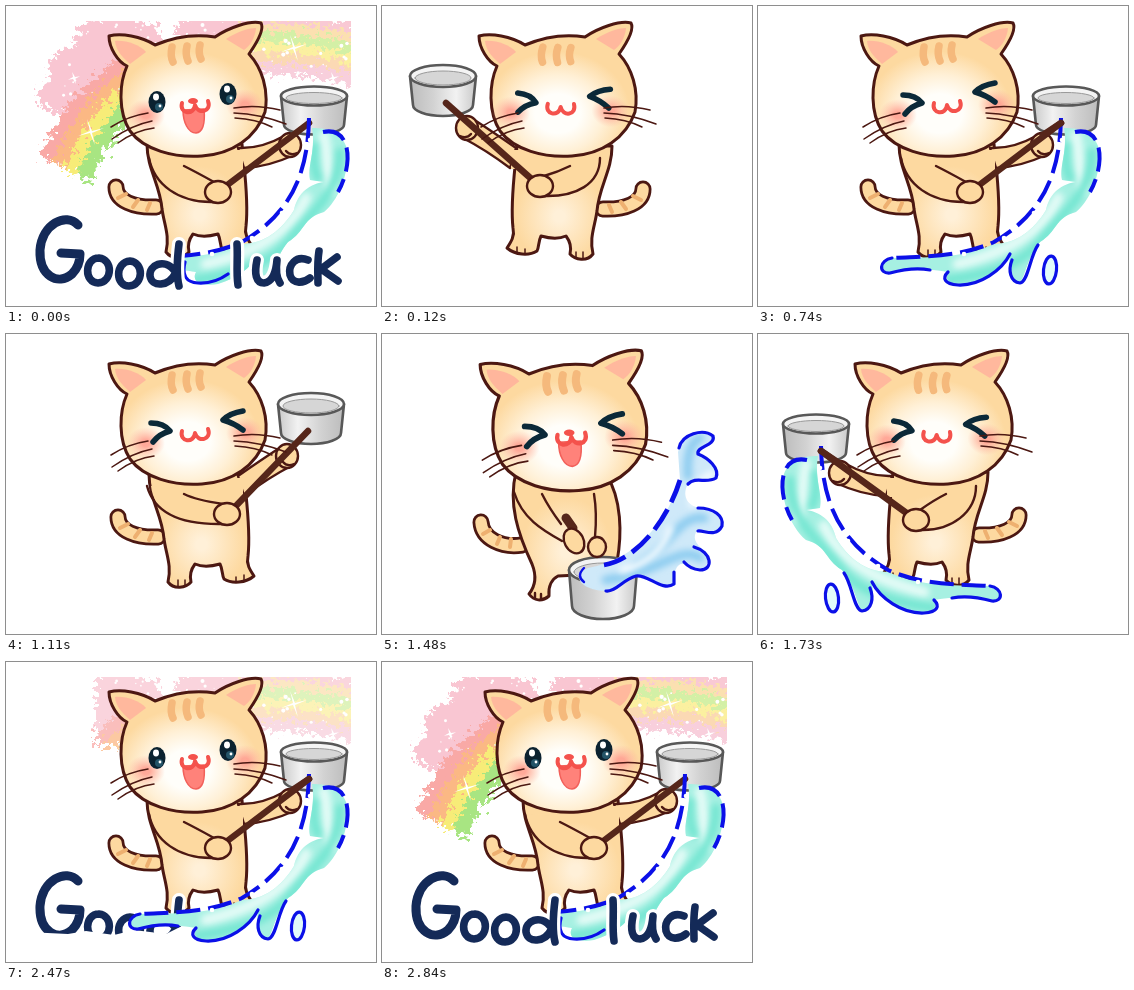
These frames come from a looping animation (370x300 px, 2.96 s). An HTML page:

```html
<!DOCTYPE html>
<html lang="en">
<head>
<meta charset="utf-8">
<title>Good luck</title>
<style>
html, body { margin: 0; width: 100%; height: 100%; overflow: hidden; background: #fff; }
svg { display: block; width: 370px; height: 300px; }
.fur { fill: #fdd9a0; stroke: #4c1812; stroke-width: 3; }
.limb { stroke-width: 2.4; }
.line { fill: none; stroke: #4c1812; stroke-width: 2.4; }
.hair { fill: none; stroke: #4c1812; stroke-width: 1.5; }
.stripe { fill: none; stroke: #f5b97c; stroke-width: 7.5; }
.blue { fill: none; stroke: #0b10e8; stroke-width: 3.2; }
.dash { stroke-width: 4; stroke-dasharray: 24 8; stroke-linecap: butt; }
.lid { fill: none; stroke: #0b2938; stroke-width: 5.5; }
.wood { fill: none; stroke: #56261a; stroke-width: 6.5; }
.metal { stroke: #585858; stroke-width: 2.6; }
.ink { fill: none; stroke: #142a58; }
.halo { fill: none; stroke: #fff; }
</style>
</head>
<body>
<svg id="stage" viewBox="0 0 370 300" stroke-linecap="round" stroke-linejoin="round">
  <defs>
    <radialGradient id="skin" cx=".5" cy=".68" r=".58">
      <stop offset=".25" stop-color="#fffefa"/><stop offset=".5" stop-color="#fff0d6"/>
      <stop offset=".8" stop-color="#fdd9a0"/>
    </radialGradient>
    <radialGradient id="belly" cx=".5" cy=".62" r=".5">
      <stop offset=".1" stop-color="#fff0d8"/><stop offset=".85" stop-color="#fdd9a0"/>
    </radialGradient>
    <radialGradient id="blush">
      <stop offset=".2" stop-color="#ffa192" stop-opacity=".9"/><stop offset="1" stop-color="#ffb6a0" stop-opacity="0"/>
    </radialGradient>
    <linearGradient id="tin">
      <stop offset="0" stop-color="#c9c9c9"/><stop offset=".3" stop-color="#f2f2f2"/>
      <stop offset=".65" stop-color="#d2d2d2"/><stop offset="1" stop-color="#bcbcbc"/>
    </linearGradient>
    <filter id="rough" x="-10%" y="-20%" width="120%" height="140%">
      <feTurbulence type="fractalNoise" baseFrequency=".2" numOctaves="3" seed="4"/>
      <feDisplacementMap in="SourceGraphic" scale="24" xChannelSelector="R" yChannelSelector="G"/>
    </filter>
    <filter id="soft"><feGaussianBlur stdDeviation="3"/></filter>
    <clipPath id="sky"><path d="M28,15H345V182H28Z"/></clipPath>
    <clipPath id="skyHalf"><path d="M90,0H360V84H90Z"/></clipPath>
    <clipPath id="skyMost"><path d="M20,0H360V190H20Z"/></clipPath>
    <clipPath id="wordHalf"><path d="M20,200H180V262L160,272L128,268L108,273L80,269L62,272L20,270Z"/></clipPath>
    <clipPath id="tailEnd"><path d="M50,205H343V285H50Z"/></clipPath>
    <clipPath id="noTip"><path d="M175,100H345V285H175Z"/></clipPath>
    <clipPath id="wet"><path id="wetEdge"/></clipPath>
    <clipPath id="splashClip"><path id="splashEdge"/></clipPath>
  </defs>
</svg>
<script>
const LOOP = 2960, AXIS = 366;
const stage = document.getElementById('stage');

const path = (d, cls, extra = '') => `<path class="${cls}" d="${d}" ${extra}/>`;
const brush = (d, color, width, extra = '') =>
  path(d, '', `fill="none" stroke="${color}" stroke-width="${width}" ${extra}`);
const oval = (x, y, rx, ry, extra = '') => `<ellipse cx="${x}" cy="${y}" rx="${rx}" ry="${ry}" ${extra}/>`;
const group = (inner, attrs) => `<g ${attrs}>${inner}</g>`;
const flip = inner => group(inner, `transform="translate(${AXIS} 0) scale(-1 1)"`);
const move = (inner, x, y) => group(inner, `transform="translate(${x} ${y})"`);
const stretch = (inner, x) => group(inner, `transform="translate(${x} -1) scale(1.06 1.05)"`);

function random(seed) {
  return () => (seed = (seed * 16807) % 2147483647) / 2147483647;
}

// Head, shared by all poses
const skull = 'M121,60C113,78 112,106 124,125C138,144 168,152 196,150C226,148 250,132 259,106' +
  'C263,84 256,62 243,48C250,38 259,24 255,17C244,14 222,22 209,31C190,28 168,31 149,39' +
  'C135,30 115,27 103,30C103,42 112,56 121,60Z';

function eyes(open) {
  if (!open) return path('M145,89Q158,89 164,97Q153,100 147,108M237,77Q224,79 217,86Q228,89 237,96', 'lid');
  return [[151, 96], [222, 88]].map(([x, y]) =>
    oval(x, y, 8.5, 11, 'fill="#0b2230"') + oval(x + 2, y + 5, 4, 4, 'fill="#245468"') +
    oval(x - 1, y - 5, 3, 3.4, 'fill="#fff"') + oval(x + 3, y + 4, 1.4, 1.4, 'fill="#fff"')).join('');
}

function mouth(open) {
  const tongue = open ? path('M177,104C177,116 182,127 190,127C198,126 199,114 198,103Z', '',
    'fill="#ff827a" stroke="#f2605a" stroke-width="1.5"') : '';
  return tongue +
    brush('M176,97C173,108 188,110 189,99C192,109 206,106 202,95', '#f4524c', 4) +
    (open ? oval(187, 95, 5, 3, 'fill="#f4524c"') : '');
}

function head(eyesOpen, mouthOpen, turn = 0) {
  const face = path('M166,41Q164,50 167,56M181,40Q179,48 182,55M194,39Q192,47 195,53', 'stripe') +
    oval(140, 109, 19, 16, 'fill="url(#blush)"') + oval(239, 99, 19, 16, 'fill="url(#blush)"') +
    eyes(eyesOpen) + mouth(mouthOpen);
  return path(skull, 'fur', 'style="fill:url(#skin)"') +
    path('M109,35C120,34 134,39 140,46L124,58C115,50 110,44 109,35Z', '', 'fill="#ffb19c" opacity=".85"') +
    path('M220,33C232,25 244,22 250,22C249,32 244,40 238,44Z', '', 'fill="#ffb19c" opacity=".85"') +
    group(face, turn ? `transform="translate(-4 2) rotate(${turn} 190 95)"` : '') +
    path('M105,121Q122,110 142,107M106,133Q126,119 146,115M112,137Q130,124 148,122' +
      'M228,102Q250,98 274,104M228,107Q254,108 280,118M229,112Q250,113 266,121', 'hair');
}

function tail(d, bands) {
  return brush(d, '#4c1812', 17) + brush(d, '#fdd9a0', 11.5) + brush(bands, '#eeb070', 4);
}

function bucket(x, y, rx, ry, h) {
  const b = rx - 3;
  return path(`M${x - rx},${y}L${x - b},${y + h}A${b},${ry} 0 0 0 ${x + b},${y + h}L${x + rx},${y}Z`,
    'metal', 'fill="url(#tin)"') +
    oval(x, y, rx, ry, 'class="metal" fill="#f4f4f4"') +
    oval(x, y + 2, rx - 5, ry - 4, 'fill="#d6d6d6" stroke="#999"');
}

const trunk = 'M143,140C143,165 156,180 158,205C160,220 166,232 162,248C168,256 180,254 185,248' +
  'C183,240 186,234 189,230C198,234 207,232 214,230C217,236 216,242 218,245C226,250 240,249 248,242' +
  'C244,236 240,230 242,222C245,195 240,165 238,140Z';

// Far paw, near paw, stick tip, ladle rim and body shift
const raised = { bx: 281, by: 122, fx: 221, fy: 180, sx: 302, sy: 97, tx: 305, ty: 70, rim: 11, dx: 0, dy: 0 };
const lowered = { bx: 284, by: 139, fx: 212, fy: 186, sx: 303, sy: 117, tx: 308, ty: 90, rim: 9.5, dx: -2, dy: -2 };

// Body holding the ladle up on the right
function hold({ bx, by, fx, fy, sx, sy, tx, ty, rim, dx, dy }) {
  const torso = tail('M152,203C130,204 112,197 112,183', 'M122,190L114,194M134,196L129,203M146,199L143,206') +
    path(trunk, 'fur', 'style="fill:url(#belly)"') +
    path('M172,246V252M179,246V251M230,243V247M238,241V246', 'hair');
  return move(torso, dx, dy) +
    path(`M232,142Q255,${by + 4} ${bx - 6},${by - 9}L${bx + 4},${by + 10}Q262,${by + 22} 238,162Z`, 'fur limb') +
    path('M226,144H237V163H226Z', '', 'fill="#fdd9a0"') +
    path(`M145,152C148,178 172,${fy + 12} ${fx - 4},${fy + 10}L${fx},${fy - 9}C${fx - 16},${fy - 10} 188,164 178,154Z`, '', 'fill="#fdd9a0"') +
    path(`M${141 - dx},152C148,178 172,${fy + 11} ${fx - 4},${fy + 10}M178,160Q190,166 ${fx - 4},${fy - 10}`, 'line') +
    oval(bx, by, 11, 12, 'class="fur limb"') +
    bucket(tx, ty, 33, rim, 29) +
    path(`M${fx + 4},${fy - 3}L${sx},${sy}`, 'wood') +
    path(`M${bx - 4},${by + 6}Q${bx},${by + 11} ${bx + 7},${by + 8}`, 'line') +
    oval(fx, fy, 13, 11, 'class="fur limb"');
}

// Water flung out of the ladle on the right
const inner = 'M303,112C302,160 290,205 236,236C200,252 165,250 134,252';
const wave = 'M306,122C310,145 301,160 304,174L318,176C304,178 292,186 288,204C276,224 258,238 236,238' +
  'C200,254 165,251 134,252C121,254 120,268 132,268C152,262 165,262 190,266C184,278 200,280 212,278C232,272 244,262 252,250' +
  'C250,268 252,278 262,277C268,268 270,250 282,236C300,225 296,212 318,206C335,192 345,160 340,140C335,126 322,122 306,122Z';
document.getElementById('wetEdge').setAttribute('d', wave);

function water(lobes) {
  const tint = path(wave, '', 'fill="#a6f0e2"') + group(
    brush('M318,130C324,160 320,172 326,184M300,192C284,226 250,246 200,258', '#e2fbf6', 11, 'filter="url(#soft)"') +
    brush('M334,146C334,186 306,206 284,234S220,270 190,274M308,140Q306,160 312,172', '#74e6d2', 9, 'filter="url(#soft)"'),
    'clip-path="url(#wet)"');
  const edge = path(inner, 'blue dash') + path('M317,126C346,120 347,160 332,186', 'blue dash');
  const rims = lobes
    ? path('M134,252C121,254 120,268 132,267C150,262 162,262 172,264M190,266C184,272 186,278 200,279C222,280 244,264 252,248' +
        'M254,254C250,264 252,276 262,277C270,276 272,250 280,239', 'blue') +
      oval(292, 264, 6.5, 14, 'class="blue" style="fill:#e2fbfa" transform="rotate(6 292 264)"')
    : path('M179,256Q174,276 192,277Q208,278 222,268', 'blue');
  const drops = [[296, 170], [276, 207], [246, 232], [206, 248], [304, 134]]
    .map(([x, y]) => oval(x, y, 2.3, 2.3, 'fill="#fff"')).join('');
  return tint + edge + rims + drops;
}

// Body bending down on the left to fill the ladle
const splashShape = 'M70,118C66,100 45,94 35,102C32,112 52,112 50,120C40,124 28,134 32,144C42,150 52,142 60,150' +
  'C66,160 62,172 48,174C34,174 24,182 26,192C32,204 44,196 52,198C56,206 50,212 42,218C36,232 46,240 60,232' +
  'C70,226 74,234 74,250C86,258 100,240 112,242C126,246 132,258 142,257C170,256 176,240 160,234C110,225 80,185 68,146Z';
document.getElementById('splashEdge').setAttribute('d', splashShape);

function scoopBody() {
  return tail('M226,211C246,214 266,205 267,188', 'M258,196L265,200M248,203L251,210M237,205L238,213') +
    path('M142,140C126,165 126,200 131,228L150,240L190,242C196,245 200,252 199,262C206,268 214,267 219,260' +
      'C211,250 212,240 216,230C230,200 240,170 232,138Z', 'fur', 'style="fill:url(#belly)"') +
    path('M154,160C151,178 152,192 153,203M234,158C226,184 206,196 186,207M206,160C199,174 193,182 187,190M207,260V265M213,259V264', 'line') +
    brush('M182,184L175,194', '#56261a', 9);
}

function scoopWater() {
  return bucket(145, 236, 34, 13, 36) +
    path(splashShape, '', 'fill="#cfe9f9"') +
    group(brush('M44,184C70,180 78,215 112,232M48,224C68,210 90,240 142,246M48,104Q62,110 60,142',
      '#8fcdf0', 9, 'filter="url(#soft)"') +
      brush('M78,195Q90,228 126,236M36,140Q56,150 56,170', '#f4fbff', 7, 'filter="url(#soft)"'), 'clip-path="url(#splashClip)"') +
    path('M68,146C80,185 110,225 144,231', 'blue dash', 'style="stroke-width:4.8"') +
    path('M69,114C66,100 45,94 35,102C32,112 52,112 50,120C40,124 28,134 32,144C42,150 52,142 60,150' +
      'M50,174C34,174 24,182 26,192C32,204 44,196 50,197M54,213C36,218 34,236 48,236Q58,235 64,228' +
      'M74,238V250C86,258 100,240 112,242C126,246 132,258 142,257', 'blue') +
    path('M164,234Q172,242 164,248', '', 'fill="none" stroke="#0b10e8" stroke-width="2.4"') +
    oval(151, 213, 9, 10, 'class="fur limb"') +
    oval(174, 207, 9.5, 13, 'class="fur limb" transform="rotate(28 174 207)"');
}

// Rainbow and lettering
function rainbow(clip, opacity) {
  const rand = random(23);
  const bow = ['#f9a9a6', '#fbb884', '#f7ec78', '#a8e582'].map((c, i) =>
    brush('M42,154C58,112 84,76 130,54', c, 16, `stroke-linecap="butt" transform="translate(${i * 12} ${i * 6})"`)).join('');
  const haze = ['#f9c9d4', '#fbe0b0', '#d3f0a6', '#fbf0a0', '#fbd9b4', '#f8cfdc'].map((c, i) =>
    brush('M236,14Q290,8 356,26', c, 12, `transform="translate(0 ${i * 10})"`)).join('');
  const clouds = [[62, 90, 32, 18], [84, 62, 42, 24], [112, 32, 44, 22], [205, 22, 36, 14]]
    .map(([x, y, rx, ry]) => oval(x, y, rx, ry, 'fill="#f9c6d2"')).join('');
  let specks = '';
  for (let i = 0; i < 110; i++) {
    const r = .5 + rand() * 1.6;
    specks += oval((32 + rand() * 310).toFixed(1), (16 + rand() * 80).toFixed(1), r, r, 'fill="#fff"');
  }
  const stars = [[85, 126, 13], [288, 42, 13], [68, 72, 6], [327, 72, 6]].map(([x, y, r]) =>
    path(`M${x - r},${y + r * .3}L${x - 1},${y - 1}L${x - r * .3},${y - r}L${x + 1},${y - 1}L${x + r},${y - r * .3}L${x + 1},${y + 1}L${x + r * .3},${y + r}L${x - 1},${y + 1}Z`, '', 'fill="#fff"')).join('');
  const paint = group(group(clouds + bow + haze, `clip-path="url(#${clip})"`), 'filter="url(#rough)"');
  return group(paint + specks + stars, `clip-path="url(#sky)" opacity="${opacity}"`);
}

const capital = 'M72,219C60,206 36,218 34,244C33,270 52,280 66,268C72,262 74,254 74,248L55,247';
const letters = 'M93,252C78,252 78,277 92,277C107,276 107,253 93,252' +
  'M124,255C109,256 109,280 123,280C138,279 138,256 124,255' +
  'M168,264C158,252 143,259 144,270C146,282 163,280 169,268M173,238C171,254 170,268 173,280' +
  'M231,238C232,252 230,266 232,279' +
  'M251,254C248,268 250,277 258,277C266,276 270,266 271,254Q269,270 274,277' +
  'M302,254C290,249 282,259 284,269C287,279 298,277 304,272' +
  'M313,245C311,258 312,268 312,277M331,251L315,263L332,275';

function lettering(clip) {
  const word = path(capital, 'halo', 'stroke-width="15"') + path(letters, 'halo', 'stroke-width="14"') +
    path(capital, 'ink', 'stroke-width="9"') + path(letters, 'ink', 'stroke-width="7.6"');
  return group(word, 'role="img" aria-label="Good luck"' + (clip ? ` clip-path="url(#${clip})"` : ''));
}

// Scenes
const right = hold(lowered) + head(true, true);
const calmRight = head(false, false);
const calmLeft = move(head(false, false, 5), -6, 0);
const leftward = pose => flip(hold({ ...pose, fx: 208, dx: -7 }));
const restRight = hold(raised) + calmRight;
const restLeft = leftward(raised) + calmLeft;
const scoopLeft = scoopBody() + stretch(head(false, true, 8), -16.5) + scoopWater();
const scoopRight = flip(scoopBody()) + stretch(head(false, true), -11) + flip(scoopWater());
const splash = water(true) + path('M285,129L303,117', 'wood');
const calmWater = group(water(false), 'clip-path="url(#noTip)"');
const finale = rainbow('skyMost', 1) + right + calmWater + lettering();

const scenes = [
  [0, finale],
  [120, restLeft],
  [490, scoopLeft],
  [740, hold(lowered) + calmRight + splash],
  [990, restRight + group(water(true), 'clip-path="url(#tailEnd)"')],
  [1110, restRight],
  [1480, scoopRight],
  [1730, leftward(lowered) + calmLeft + flip(splash)],
  [1980, restLeft],
  [2230, scoopLeft],
  [2350, right + splash],
  [2470, rainbow('skyHalf', .75) + right + lettering('wordHalf') + splash],
  [2720, rainbow('skyMost', .9) + right + calmWater + lettering()],
  [2840, finale]
];

const layers = scenes.map(([, markup]) => {
  const g = document.createElementNS('http://www.w3.org/2000/svg', 'g');
  g.innerHTML = markup;
  g.style.display = 'none';
  stage.append(g);
  return g;
});

let shown = -1;
function draw(time) {
  const t = time % LOOP;
  const next = scenes.findLastIndex(([start]) => start <= t);
  if (next !== shown) {
    if (shown >= 0) layers[shown].style.display = 'none';
    layers[next].style.display = '';
    shown = next;
  }
}

const begin = performance.now();
function tick() {
  draw(performance.now() - begin);
  requestAnimationFrame(tick);
}
tick();
</script>
</body>
</html>
```
